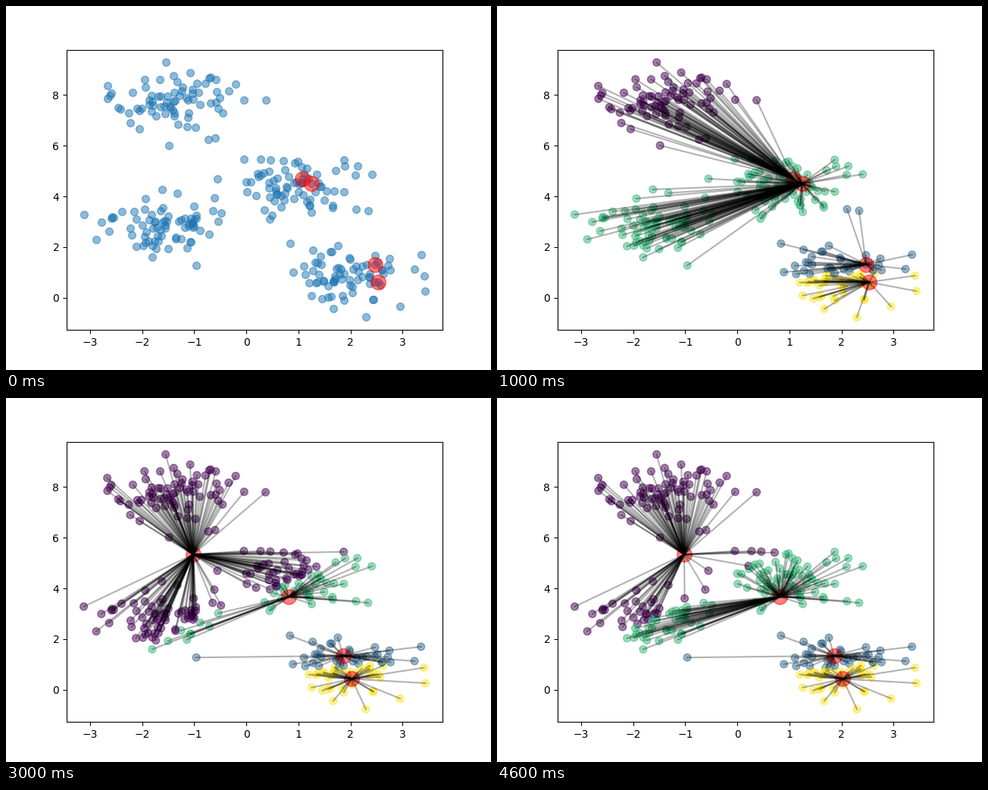
A matplotlib script that plays this animation: 640x480 px, repeating every 5000 ms.

```python
import numpy as np
import matplotlib.pyplot as plt
from matplotlib.animation import FuncAnimation
from matplotlib.collections import LineCollection

K = 4
PER_BLOB = 75
SPREAD = 0.60
# Rough starting spots; each one is moved onto its nearest data point.
SEEDS = np.array([[1.077, 4.686], [2.474, 1.293], [1.245, 4.512], [2.533, 0.62]])


def make_blobs():
    rng = np.random.RandomState(0)
    mids = rng.uniform(-10, 10, size=(K, 2))
    pts = np.concatenate([rng.normal(m, SPREAD, size=(PER_BLOB, 2)) for m in mids])
    order = np.arange(len(pts))
    rng.shuffle(order)
    return pts[order]


def nearest(pts, targets, scale=1.0):
    """Index of the closest target for every point."""
    gap = (pts[:, None] - targets[None]) * scale
    return (gap ** 2).sum(axis=2).argmin(axis=1)


def means(labels):
    return np.array([X[labels == k].mean(axis=0) for k in range(K)])


def converge(centers):
    while True:
        labels = nearest(X, centers)
        moved = means(labels)
        if np.allclose(moved, centers):
            return labels
        centers = moved


X = make_blobs()
start = X[nearest(SEEDS, X, scale=np.array([2.0, 1.0]))]
first = nearest(X, start)
second = means(first)

# (centers, labels) for each step
STEPS = [
    (start, None),
    (start, converge(start)),
    (start, first),
    (second, first),
    (second, nearest(X, second)),
]

fig, ax = plt.subplots(figsize=(6.4, 4.8), dpi=100)


def draw(i):
    centers, labels = STEPS[i]
    ax.clear()
    if labels is None:
        ax.scatter(*X.T, s=50, alpha=0.5)
    else:
        ax.scatter(*X.T, c=labels, s=50, cmap="viridis", alpha=0.5)
    ax.scatter(*centers.T, c="red", s=200, alpha=0.5)
    if labels is not None:
        links = np.stack([X, centers[labels]], axis=1)
        ax.add_collection(LineCollection(links, colors="black", linewidths=1.5,
                                         alpha=0.3, capstyle="projecting", zorder=2),
                          autolim=False)
    return ax.get_children()


anim = FuncAnimation(fig, draw, frames=len(STEPS), interval=1000,
                     repeat=True, repeat_delay=0)
plt.show()
```
